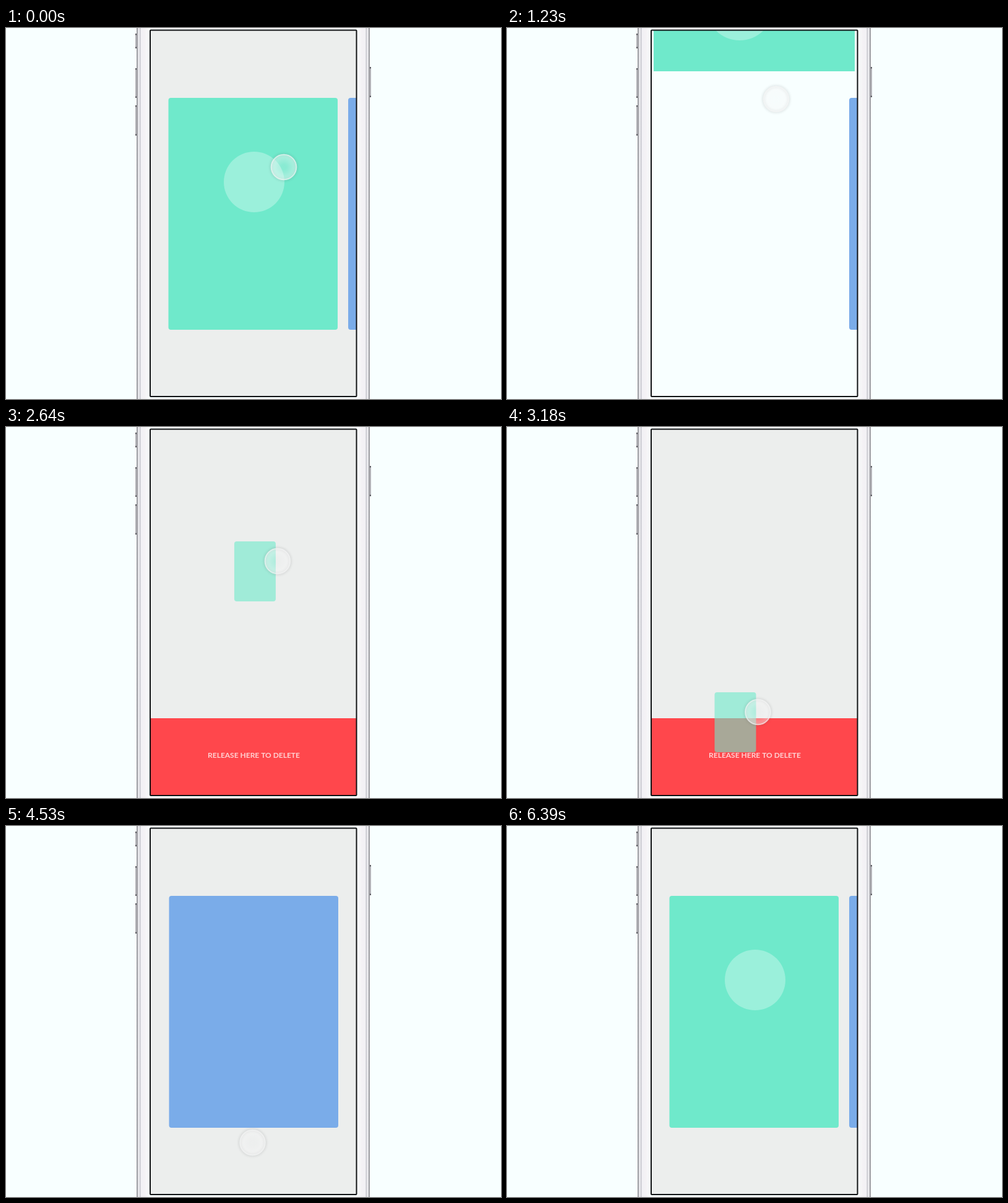
Animation, 800 px wide and 600 px high, one loop 6.57 s. Source, as an HTML page with a canvas:

```html
<!DOCTYPE html>
<html lang="en">
<head>
<meta charset="utf-8">
<title>Card gestures</title>
<style>
html, body { margin: 0; width: 100%; height: 100%; overflow: hidden; background: #f8ffff; }
canvas { display: block; }
</style>
</head>
<body>
<canvas width="800" height="600"></canvas>
<script>
const ctx = document.querySelector('canvas').getContext('2d');
const LOOP = 6570;
const BACKDROP = '#f8ffff', GREEN = '#6fe9cb', BLUE = '#7aace9', RED = [255, 71, 76], DONE = [127, 217, 157];
const CARD = { x: 262.5, y: 113, w: 273.5, h: 375 };
const SCREEN = { x: 233, y: 4, w: 333, h: 592 };

const lerp = (a, b, k) => a + (b - a) * k;
const ramp = (t, from, to) => {
  const k = Math.min(1, Math.max(0, (t - from) / (to - from)));
  return k * k * (3 - 2 * k);
};
const easeOut = (t, from, to) => 1 - (1 - Math.min(1, Math.max(0, (t - from) / (to - from)))) ** 3;

// Each stop is [time, x, y]; movement eases between stops.
const touchPath = [
  [300, 449, 225], [420, 438, 228], [860, 438, 228], [1190, 435, 115],
  [1240, 435, 115], [1700, 436, 290], [2280, 436, 290], [2560, 440, 209],
  [3400, 398.5, 512], [4800, 398.5, 512], [5130, 410, 331], [5340, 410, 331],
  [5700, 530, 300], [6000, 500, 29], [6120, 495, -30]
];

function touchAt(t) {
  let [, x, y] = touchPath[0];
  touchPath.slice(1).forEach(([end, nx, ny], i) => {
    const k = ramp(t, touchPath[i][0], end);
    x = lerp(x, nx, k);
    y = lerp(y, ny, k);
  });
  return { x, y };
}

function box(x, y, w, h, radius, color) {
  ctx.fillStyle = color;
  ctx.beginPath();
  ctx.roundRect(x, y, w, h, radius);
  ctx.fill();
}

function disc(x, y, r, color) {
  ctx.fillStyle = color;
  ctx.beginPath();
  ctx.arc(x, y, r, 0, Math.PI * 2);
  ctx.fill();
}

function label(text, y, alpha) {
  ctx.font = '700 12px Lato, sans-serif';
  ctx.textAlign = 'center';
  ctx.fillStyle = `rgba(255,255,255,${alpha})`;
  ctx.fillText(text, 400.5, y);
}

function sideEdge(x, direction) {
  const g = ctx.createLinearGradient(x, 0, x + direction * 22, 0);
  [[0, '#96969b'], [.08, '#a9a9ae'], [.12, '#e5e5e9'], [.2, '#f0f0f3'], [.25, '#c4c4cb'],
    [.34, '#f2f1f5'], [.6, '#f4f2f5'], [1, '#fbffff']].forEach(([p, c]) => g.addColorStop(p, c));
  ctx.fillStyle = g;
  ctx.fillRect(Math.min(x, x + direction * 22), 0, 22, 600);
}

function sideButton(x, y, h) {
  box(x, y, 3, h, 1, '#b4b4b9');
  box(x, y, 3, 2.5, 1, '#55555a');
  box(x, y + h - 2.5, 3, 2.5, 1, '#55555a');
}

function drawPhone() {
  ctx.fillStyle = BACKDROP;
  ctx.fillRect(0, 0, 800, 600);
  [[9, 24], [65, 48], [125, 49]].forEach(([y, h]) => sideButton(209, y, h));
  sideButton(587, 63, 49);
  sideEdge(211, 1);
  sideEdge(588, -1);
}

function drawGreenCard(t, touch, slide) {
  const open = ramp(t, 570, 870) * (1 - ramp(t, 1450, 1850));
  const held = t < 5340 ? ramp(t, 2280, 2560) : 0;
  const gone = t < 5340 ? ramp(t, 3400, 3570) : 0;
  if (gone === 1) return;

  // The opened page scrolls with the finger.
  const scroll = touch.y - 228;
  const top = Math.min(5, 5 + scroll);
  let x = lerp(CARD.x + slide, 237, open);
  let y = lerp(CARD.y, top, open);
  let w = lerp(CARD.w, 325, open);
  let h = lerp(CARD.h, 183 + scroll - top, open);

  if (held) {
    const size = 1 - gone;
    const cx = lerp(399.5, touch.x - 36.5, held), cy = lerp(300.5, touch.y + 16.5, held);
    w = lerp(w, 67, held) * size;
    h = lerp(h, 97, held) * size;
    x = cx - w / 2;
    y = cy - h / 2;
  }

  ctx.save();
  ctx.globalAlpha = 1 - .4 * held;
  box(x, y, w, h, lerp(4, 0, open), GREEN);
  ctx.clip();
  const zoom = w / CARD.w;
  const circleX = held ? x + w / 2 : lerp(401 + slide, 376, open);
  const circleY = held ? y + 136 * h / CARD.h : lerp(249, 79 + scroll, open);
  disc(circleX, circleY, held ? 49 * zoom : lerp(49, 54, open),
    `rgba(255,255,255,${.3 * (1 - held)})`);
  ctx.restore();
}

function drawPanel(t) {
  const release = ramp(t, 3400, 3590);
  const height = lerp(125, 56.5, release);
  const rise = ramp(t, 2340, 2600) * (1 - ramp(t, 4110, 4380));
  if (!rise) return;
  const y = 596 - height * rise;
  const color = RED.map((c, i) => Math.round(lerp(c, DONE[i], release)));
  ctx.fillStyle = `rgb(${color})`;
  ctx.fillRect(SCREEN.x, y, SCREEN.w, height);
  const baseline = y + height / 2 + 1.5;
  if (release < .5) label('RELEASE HERE TO DELETE', baseline, .75 * (1 - 2 * release));
  else label('DELETED', baseline, 2 * release - 1);
}

function drawTouch({ x, y }) {
  ctx.save();
  ctx.shadowColor = 'rgba(70,70,75,.5)';
  ctx.shadowBlur = 4;
  ctx.strokeStyle = 'rgba(245,246,246,.65)';
  ctx.lineWidth = 1.8;
  ctx.beginPath();
  ctx.arc(x, y, 20.4, 0, Math.PI * 2);
  ctx.stroke();
  ctx.restore();
  const g = ctx.createRadialGradient(x, y, 4, x, y, 21);
  g.addColorStop(0, 'rgba(242,242,243,.2)');
  g.addColorStop(1, 'rgba(250,250,250,.5)');
  disc(x, y, 20.5, g);
}

function draw(t) {
  const touch = touchAt(t);
  const white = ramp(t, 570, 870) * (1 - ramp(t, 1450, 1850));
  const swipe = ramp(t, 5340, 6200);
  let blueX = 553 + 20 * ramp(t, 2280, 2420);
  if (t >= 4110) blueX = lerp(573, 263.5, easeOut(t, 4110, 4380));
  if (t >= 5340) blueX = lerp(263.5, 553, swipe);

  drawPhone();
  ctx.save();
  ctx.beginPath();
  ctx.rect(SCREEN.x, SCREEN.y, SCREEN.w, SCREEN.h);
  ctx.clip();
  ctx.fillStyle = '#eceeed';
  ctx.fillRect(SCREEN.x, SCREEN.y, SCREEN.w, SCREEN.h);
  ctx.globalAlpha = white;
  ctx.fillStyle = BACKDROP;
  ctx.fillRect(SCREEN.x, SCREEN.y, SCREEN.w, SCREEN.h);
  ctx.globalAlpha = 1;
  drawPanel(t);
  drawGreenCard(t, touch, t < 5340 ? 0 : blueX - 553);
  box(blueX, CARD.y, CARD.w, CARD.h, 4, BLUE);
  drawTouch(touch);
  ctx.restore();

  ctx.strokeStyle = '#101214';
  ctx.lineWidth = 2;
  ctx.beginPath();
  ctx.roundRect(233, 3.5, 333.5, 592.5, 1);
  ctx.stroke();
}

function frame() {
  draw(performance.now() % LOOP);
  requestAnimationFrame(frame);
}
frame();
</script>
</body>
</html>
```
